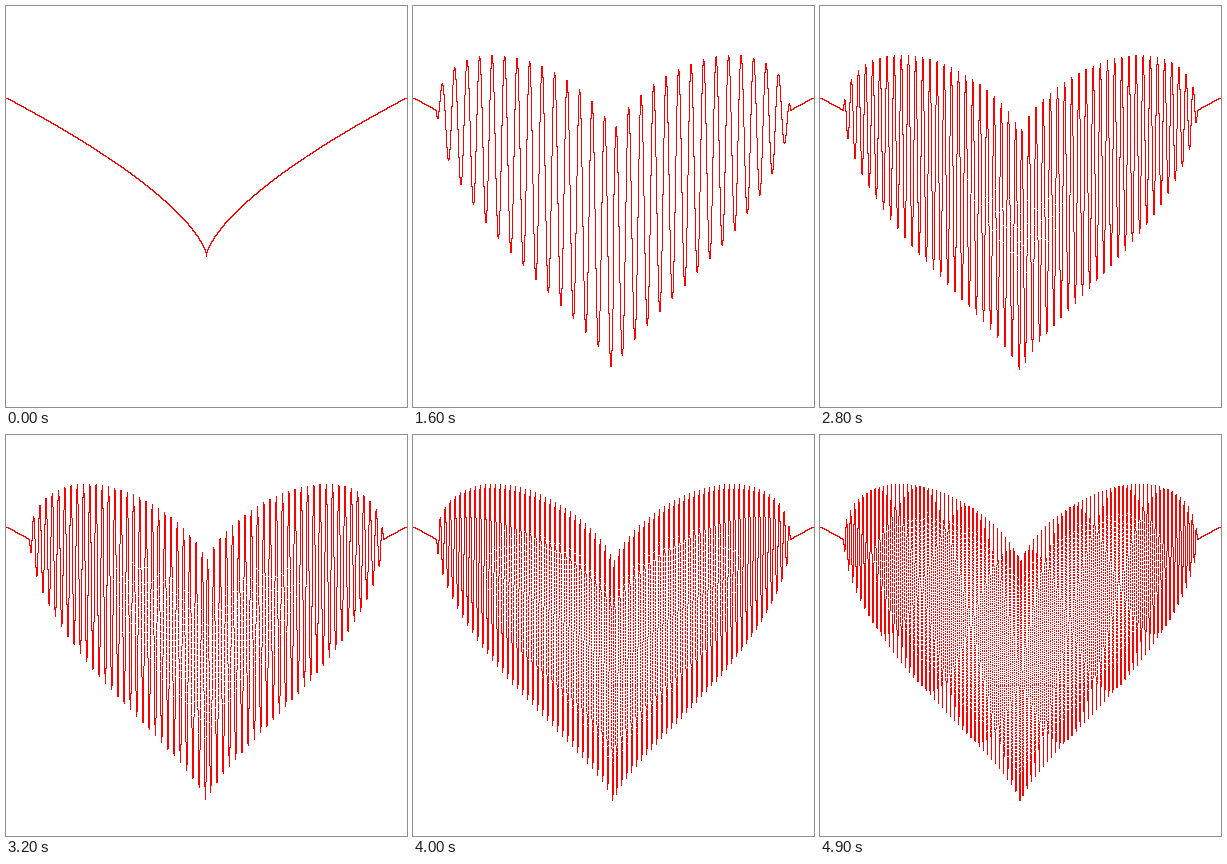
These frames come from a looping animation (401x401 px, 5000 ms). An HTML page with a canvas:

```html
<!DOCTYPE html>
<html lang="en">
<head>
<meta charset="utf-8">
<title>Heart curve</title>
<style>
  html, body { margin: 0; width: 100%; height: 100%; overflow: hidden; background: #fff; }
  canvas { display: block; }
</style>
</head>
<body>
<canvas id="plot" width="401" height="401"></canvas>
<script>
const SIZE = 401, UNIT = 100, ORIGIN_X = 200, ORIGIN_Y = 250;
const STEPS = 50, STEP_MS = 100;
const SAMPLES = 10000; // points per unit of x
const WHITE = 0xffffffff, RED = 0xff0000ff; // ABGR

const ctx = document.getElementById('plot').getContext('2d');
const image = ctx.createImageData(SIZE, SIZE);
const pixels = new Uint32Array(image.data.buffer);

// y = |x|^(2/3) + e/4 * sqrt(pi - x^2) * sin(k * pi * x)
function heart(x, k) {
  const envelope = Math.sqrt(Math.max(0, Math.PI - x * x));
  return Math.cbrt(x * x) + Math.E / 4 * envelope * Math.sin(k * Math.PI * x);
}

function draw(k) {
  pixels.fill(WHITE);
  for (let i = -2 * SAMPLES; i <= 2 * SAMPLES; i++) {
    const x = i / SAMPLES;
    const col = ORIGIN_X + Math.trunc(i * UNIT / SAMPLES);
    const row = ORIGIN_Y - Math.trunc(heart(x, k) * UNIT);
    pixels[row * SIZE + col] = RED;
  }
  ctx.putImageData(image, 0, 0);
}

const start = performance.now();
let shown = -1;

function tick() {
  const k = Math.floor((performance.now() - start) / STEP_MS) % STEPS;
  if (k !== shown) draw(shown = k);
  requestAnimationFrame(tick);
}
tick();
</script>
</body>
</html>
```
